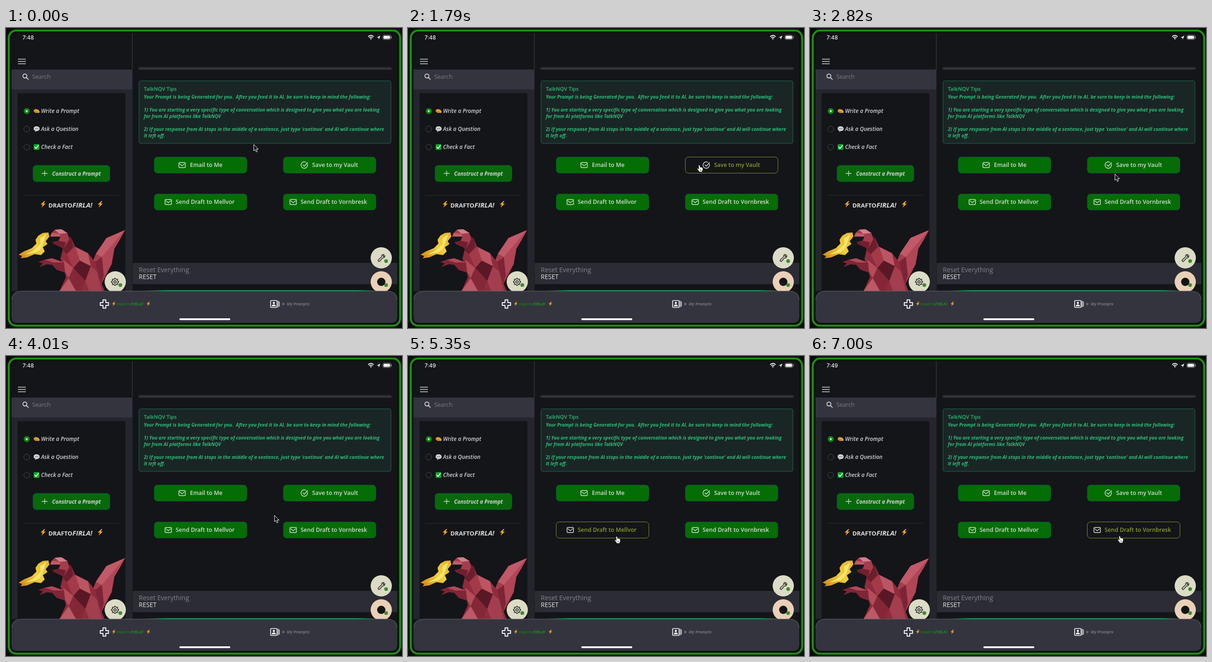
Write an HTML page that moves like this. It is 859 px wide and 650 px high and loops after 8 s.

```html
<!DOCTYPE html>
<html lang="en">
<head>
<meta charset="utf-8">
<title>Prompt tips</title>
<style>
  html, body { margin: 0; width: 100%; height: 100%; overflow: hidden; background: #0a0c0b; }
  svg { display: block; width: 100vw; height: 100vh; }
  text { font-family: "Open Sans", "Noto Sans", sans-serif; white-space: pre; }
  .clock { font: 500 11.5px Inter, sans-serif; fill: #f2f2f2; }
  .tips { font-size: 10.3px; font-style: italic; font-weight: 700; fill: #2bbd78; }
  .title { font-size: 11.3px; font-weight: 600; fill: #2bbd78; }
  .opt { font-size: 12px; font-style: italic; font-weight: 600; fill: #d2d2d4; }
  .bold { font-weight: 700; }
  .it { font-style: italic; }
  .line { fill: none; stroke-linecap: round; stroke-linejoin: round; }
  .btn rect { fill: #056d06; stroke: #06503c; }
  .btn text { font-size: 12.45px; font-weight: 600; fill: #d3dfcf; }
  .btn.hover rect { fill: #141519; stroke: #84932a; }
  .btn.hover text { fill: #85a02b; }
</style>
</head>
<body>
<svg viewBox="0 0 859 650" preserveAspectRatio="none">
  <defs>
    <filter id="soft" x="-5%" y="-300%" width="110%" height="700%"><feGaussianBlur stdDeviation="1.4"/></filter>
    <filter id="glow"><feGaussianBlur stdDeviation="1.5"/></filter>
    <linearGradient id="fire" x1="1" y1="0" x2="0" y2="1">
      <stop offset="0" stop-color="#e8b02f"/><stop offset=".5" stop-color="#efcf3c"/><stop offset="1" stop-color="#cf7f1a"/>
    </linearGradient>
    <linearGradient id="fade">
      <stop offset="0" stop-color="#1c9a50" stop-opacity="0"/><stop offset=".1" stop-color="#1c9a50"/>
      <stop offset=".9" stop-color="#1c9a50"/><stop offset="1" stop-color="#1c9a50" stop-opacity="0"/>
    </linearGradient>
    <clipPath id="screen"><rect x="12" y="11" width="837" height="628" rx="14"/></clipPath>
    <clipPath id="above"><rect width="859" height="570"/></clipPath>
    <path id="bolt" d="M8 0 0 7.5H4.5L2 14 11 5.500H6.500L10 0Z" fill="#f6a81c"/>
    <g id="mail" class="line" stroke="#e0e8dc" stroke-width="1.4">
      <rect x="-7" y="-5.500" width="14" height="11" rx="2"/><path d="M-5-2.500 0 1.500 5-2.500"/>
    </g>
    <g id="tick" class="line" stroke="#e0e8dc" stroke-width="1.4">
      <path d="M6.500-2.500A7 7 0 1 1 3-6.300M-3-.5 0 2.500 7-5.500"/>
    </g>
  </defs>

  <rect x="6" y="5.500" width="849" height="639.500" rx="16" class="line" stroke="#1d7d12" stroke-width="4" filter="url(#glow)"/>
  <rect x="6" y="5.500" width="849" height="639.500" rx="16" class="line" stroke="#289c1b" stroke-width="2.600"/>

  <g clip-path="url(#screen)">
    <rect x="12" y="11" width="837" height="628" fill="#141519"/>
    <rect x="12" y="90" width="262" height="480" fill="#25252d"/>
    <rect x="12" y="90" width="262" height="43" fill="#34343f"/>
    <rect x="273" y="11" width="2" height="79" fill="#2b2c31"/>
    <rect x="274" y="90" width="1" height="480" fill="#1b1b20"/>
    <rect x="25" y="141" width="234" height="440" rx="4" fill="#141519"/>
    <rect x="288" y="86" width="548" height="3.500" fill="#454549" filter="url(#soft)"/>
    <rect x="275" y="509" width="574" height="46" fill="#2b2c34"/>
    <rect x="300" y="568" width="510" height="2" fill="url(#fade)"/>
  </g>

  <!-- status bar -->
  <text id="clock" class="clock" x="36" y="25">7:48</text>
  <g class="line" stroke="#fff" stroke-width="1.700">
    <path d="M786 18.500Q791.500 13.500 797 18.500M788.500 21Q791.500 18.300 794.500 21"/>
  </g>
  <circle cx="791.500" cy="23.300" r="1.400" fill="#fff"/>
  <path d="M804 21 812 16.500 808.500 25 808 21Z" fill="#fff"/>
  <rect x="817.500" y="15.500" width="17" height="9.500" rx="3" class="line" stroke="#999"/>
  <rect x="819" y="17" width="14" height="6.500" rx="1.800" fill="#fff"/>
  <path d="M836 18.500v3.500" class="line" stroke="#999" stroke-width="1.300"/>

  <!-- sidebar -->
  <path d="M26 67.500H43M26 72.500H43M26 77.500H43" stroke="#d6d6d6" stroke-width="1.600"/>
  <g class="line" stroke="#e0e0e0" stroke-width="1.700"><circle cx="41" cy="104" r="4.300"/><path d="M44.300 107.300 48.500 111.500"/></g>
  <text x="57" y="110" font-size="12.700" fill="#7d7d85">Search</text>
  <circle cx="45" cy="180" r="6.500" fill="#0c8a12"/><circle cx="45" cy="180" r="2.300" fill="#c9e4c9"/>
  <g class="line" stroke="#4d4e55"><circle cx="45" cy="219" r="6.300"/><circle cx="45" cy="258" r="6.300"/></g>
  <path d="M60 178 64 175.500 70 177 73 181 72 184H65L60.500 181.500Z" fill="#e5a52a"/>
  <path d="M61 179 69 183" stroke="#8a5d18"/>
  <path d="M66 213C62 213 60 215 60 218S62 222.500 64 222.500L63 225.500 67 223C71 223 73 221 73 218S70 213 66 213Z" fill="#cfd3d8"/>
  <path d="M63 218H70" stroke="#4a4c52" stroke-width="1.600" stroke-dasharray="1.500 1.200"/>
  <rect x="60" y="251.500" width="12.500" height="12.500" rx="2" fill="#12a32a"/>
  <path d="M62.500 258 65.200 261 70 254.500" class="line" stroke="#fff" stroke-width="1.800"/>
  <text class="opt" x="76" y="184">Write a Prompt</text>
  <text class="opt" x="76" y="223">Ask a Question</text>
  <text class="opt" x="76" y="262">Check a Fact</text>
  <rect x="58.500" y="297.500" width="167" height="35.500" rx="7" fill="#08690a" stroke="#06503c"/>
  <path d="M77.500 315H90M83.800 309V321" stroke="#cfe0cb" stroke-width="1.300"/>
  <text class="opt bold" x="100" y="319.500" style="font-size:11.500px">Construct a Prompt</text>
  <path d="M38 362.500H245" stroke="#2c2d33"/>
  <use href="#bolt" x="75" y="375"/><use href="#bolt" x="199" y="375"/>
  <text x="92" y="388.500" class="bold" fill="#dadada"><tspan font-size="13">DRAFTO</tspan><tspan class="it" font-size="15">FIRLA!</tspan></text>

  <!-- folded paper dragon -->
  <g clip-path="url(#above)">
    <path d="M92 443 80 444 70 450 64 459 66 467 56 477 39 484 27 491 35 494 32 499 46 497 62 490 76 492 84 484 80 475 90 468 86 462 94 452Z" fill="url(#fire)"/>
    <path d="M88 446 74 456 75 468 60 482 42 491 66 486 76 478 82 462Z" fill="#f6e56a"/>
    <!-- wing -->
    <path d="M258 438 218 455 195 489 186 512 192 548 206 556 218 534 229 512 235 478 246 460Z" fill="#a63c4d"/>
    <path d="M258 438 218 455 195 489 208 496Z" fill="#c05a68"/>
    <path d="M258 438 208 496 212 536 229 512 235 478 246 460Z" fill="#b04555"/>
    <path d="M208 496 186 512 192 548 206 556 212 536Z" fill="#7b2537"/>
    <!-- body -->
    <path d="M130 446 142 456 150 474 178 488 194 508 200 536 214 570H116L130 540 124 514 118 500 124 476Z" fill="#8e2c3d"/>
    <path d="M130 446 142 456 146 474 132 490 122 480Z" fill="#6b1e2d"/>
    <path d="M150 474 178 488 184 516 160 504Z" fill="#bb5562"/>
    <path d="M132 490 150 474 160 504 146 520Z" fill="#a23a4a"/>
    <path d="M124 502 146 520 136 542 128 528Z" fill="#b44c5a"/>
    <path d="M146 520 160 504 184 516 172 548Z" fill="#5a1826"/>
    <path d="M184 516 198 528 208 570H180L172 548Z" fill="#a23e4e"/>
    <path d="M136 542 152 570H116Z" fill="#bd5966"/>
    <path d="M146 520 172 548 162 570H152L136 542Z" fill="#842838"/>
    <!-- arm -->
    <path d="M126 508 100 499 84 502 70 507 80 510 72 518 88 512 100 513 110 524 128 530Z" fill="#7f2636"/>
    <path d="M126 508 100 499 84 502 102 508Z" fill="#b04a58"/>
    <!-- head -->
    <path d="M96 452 99 444 106 437 120 436 133 444 137 458 126 478 104 468 101 464 114 461 118 452Z" fill="#a53c4c"/>
    <path d="M106 437 120 436 133 444 116 446Z" fill="#d08088"/>
    <path d="M96 452 99 444 116 446 118 452Z" fill="#bf5c68"/>
    <path d="M104 468 101 464 114 461 130 464 126 478Z" fill="#701f2f"/>
  </g>

  <!-- tips -->
  <rect x="288.500" y="114.500" width="546.500" height="135.500" rx="4" fill="#1a2625" stroke="#1d6c4b"/>
  <text class="title" x="299" y="136">TalkNQV Tips</text>
  <g class="tips">
    <text x="299" y="153">Your Prompt is being Generated for you.  After you feed it to AI, be sure to keep in mind the following:</text>
    <text x="299" y="181">1) You are starting a very specific type of conversation which is designed to give you what you are looking</text>
    <text x="299" y="195">for from AI platforms like TalkNQV</text>
    <text x="299" y="222.500">2) If your response from AI stops in the middle of a sentence, just type 'continue' and AI will continue where</text>
    <text x="299" y="236.500">it left off.</text>
  </g>

  <g id="buttons"></g>

  <text x="288" y="528.500" font-size="14.100" fill="#83848a">Reset Everything</text>
  <text x="288" y="544" font-size="13.600" fill="#e4e4e4">RESET</text>

  <!-- floating buttons -->
  <g clip-path="url(#above)">
    <circle cx="237" cy="550" r="23" fill="#dcdcc6"/>
    <circle cx="814" cy="498" r="23" fill="#dcdcc6"/>
    <circle cx="814" cy="550" r="23" fill="#e9d0b6"/>
    <g class="line" stroke="#222" stroke-width="1.500">
      <circle cx="236.500" cy="550" r="2.600"/>
      <path id="gear"/>
      <path d="M808 505.500C806.500 504 807 503 808 502L814.500 496C813.500 492.500 816.500 489.800 820 491L817.200 493.700 819 495.600 821.800 493C822.500 496.500 820 499 816.800 498.200L811 504.800C810 506 809 506.500 808 505.500Z"/>
    </g>
    <circle cx="814" cy="550" r="9" fill="#141414"/>
    <g fill="#3f8a2c"><circle cx="248" cy="557" r="4"/><circle cx="824.500" cy="505" r="4"/><circle cx="824.500" cy="557" r="4"/></g>
  </g>

  <!-- bottom bar -->
  <path d="M12 590Q12 570 34 570H827Q849 570 849 590V625Q849 639 835 639H26Q12 639 12 625Z" fill="#34343f"/>
  <path d="M12.500 588Q14 570 34 570H827Q847 570 848.500 588" class="line" stroke="#63656b"/>
  <path d="M210.500 589H216.500V595H222.500V601H216.500V607H210.500V601H204.500V595H210.500Z" class="line" stroke="#fff" stroke-width="1.900"/>
  <use href="#bolt" transform="translate(230 593) scale(.68)"/>
  <use href="#bolt" transform="translate(305 593) scale(.68)"/>
  <text x="240" y="601" class="bold"><tspan font-size="7.700" fill="#1c741d">DRAFTO</tspan><tspan class="it" font-size="9.300" fill="#149316">FIRLA!</tspan></text>
  <rect x="574" y="590.500" width="14" height="15" rx="1.500" class="line" stroke="#fff" stroke-width="1.600"/>
  <path d="M590.500 591V605M593 592.500V603.500" stroke="#fff" stroke-width="1.300"/>
  <circle cx="581" cy="595.800" r="2.300" fill="#fff"/><path d="M576.500 603Q577 599 581 599T585.500 603Z" fill="#fff"/>
  <path d="M599.500 594.500 605.500 598 599.500 601.500Z" fill="#6e6f77"/>
  <text x="609" y="601.300" class="bold it" font-size="8.800" fill="#74757d">My Prompts</text>
  <rect x="376" y="629" width="110.500" height="4" rx="2" fill="#fff"/>

  <g id="cursor">
    <path id="arrow" d="M.5.5V14L3.600 11.200 5.800 16.500 8.200 15.500 6 10.400H10.300Z" fill="#0a0a0a" stroke="#fff" stroke-linejoin="round"/>
    <g id="hand" transform="translate(-.5 -.5)">
      <path d="M-1.500 1.500Q0-.8 1.500 1.500L2.300 5.200Q3.400 4.200 4.300 5.300 5.500 4.600 6.300 5.800 8 5.500 8.200 7.500L8 11 6.800 13V15.500H-.2V14L-4 9.300Q-4.600 7.400-2.800 7.600L-.6 9.200Z" fill="#fff" stroke="#111" stroke-width=".9" stroke-linejoin="round"/>
      <path d="M2.300 10V13M4.200 10V13" stroke="#222" stroke-width=".8"/>
    </g>
  </g>
</svg>

<script>
const $ = id => document.getElementById(id);
const LOOP = 8000;
const W = 201, H = 36;

// x, y, icon, icon x, label x, label
const buttons = [
  [321, 279, 'mail', 382, 399, 'Email to Me'],
  [601, 279, 'tick', 647, 664, 'Save to my Vault'],
  [321, 359, 'mail', 352, 368, 'Send Draft to Mellvor'],
  [601, 359, 'mail', 623, 639, 'Send Draft to Vornbresk']
].map(([x, y, icon, ix, tx, label]) => {
  const g = document.createElementNS('http://www.w3.org/2000/svg', 'g');
  g.setAttribute('class', 'btn');
  g.innerHTML = `<rect x="${x + .5}" y="${y + .5}" width="${W}" height="${H - 1}" rx="7"/>
    <use href="#${icon}" x="${ix}" y="${y + 18}"/><text x="${tx}" y="${y + 22}">${label}</text>`;
  $('buttons').append(g);
  return { x, y, g };
});

// cursor tip over time: ms, x, y
const path = [
  [0, 537, 252], [1050, 541, 254], [1190, 552, 261], [1350, 573, 272], [1500, 596, 283],
  [1640, 617, 291], [1790, 632, 297], [1940, 648, 304], [2080, 657, 309], [2220, 664, 314],
  [2670, 661, 316], [2970, 661, 320], [3120, 661, 324],
  [3570, 654, 327], [3720, 636, 333], [3860, 608, 340], [4010, 582, 345], [4160, 560, 347],
  [4310, 542, 347], [4460, 531, 347], [4610, 525, 347],
  [4760, 517, 354], [4910, 498, 366], [5060, 476, 380], [5200, 460, 388], [5350, 453, 391],
  [5950, 474, 392], [6100, 512, 393], [6250, 556, 388], [6400, 593, 379], [6550, 640, 384],
  [6700, 675, 390], [7000, 672, 390]
];

function gearPath() {
  let d = '';
  for (let i = 0; i < 32; i++) {
    const a = (i - .5) * Math.PI / 16, r = i % 4 < 2 ? 7.8 : 6;
    d += `${i ? 'L' : 'M'}${(236.5 + r * Math.cos(a)).toFixed(1)} ${(550 + r * Math.sin(a)).toFixed(1)}`;
  }
  return d + 'Z';
}
$('gear').setAttribute('d', gearPath());

function draw(t) {
  const [, x, y] = path.findLast(p => p[0] <= t);
  let over = false;
  for (const b of buttons) {
    const hit = x >= b.x && x <= b.x + W && y >= b.y && y <= b.y + H;
    b.g.classList.toggle('hover', hit);
    over = over || hit;
  }
  $('arrow').style.display = over ? 'none' : '';
  $('hand').style.display = over ? '' : 'none';
  $('cursor').setAttribute('transform', `translate(${x} ${y})`);
  $('clock').textContent = t < 4910 ? '7:48' : '7:49';
}

const start = performance.now();
function frame() {
  draw((performance.now() - start) % LOOP);
  requestAnimationFrame(frame);
}
frame();
</script>
</body>
</html>
```
